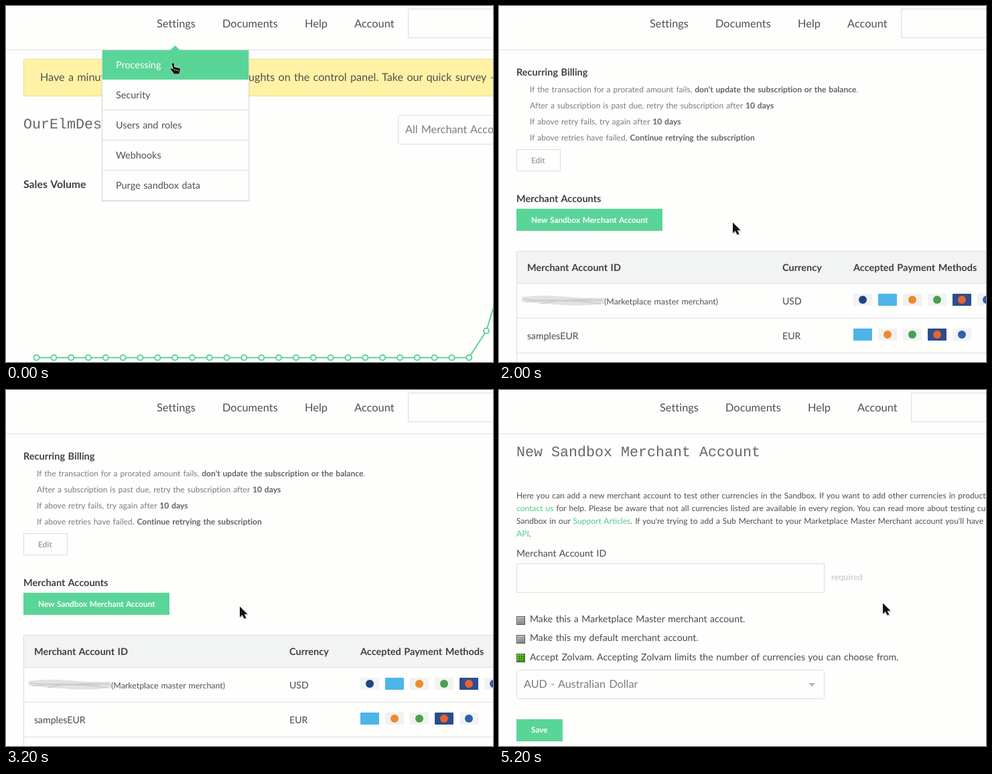
Write an HTML page that moves like this. It is 727 px wide and 532 px high and loops after 6 s.

```html
<!DOCTYPE html>
<html lang="en">
<head>
<meta charset="utf-8">
<title>Control panel</title>
<style>
html, body { margin: 0; width: 100%; height: 100%; overflow: hidden; background: #fefefd; }
svg { display: block; width: 727px; height: 532px; }
text { font-family: Lato, "Open Sans", sans-serif; fill: #505052; word-spacing: .07em; font-variant-ligatures: none; text-rendering: geometricPrecision; white-space: pre; }
.nav { font-size: 16.4px; }
.big { font-size: 16.2px; }
.mid { font-size: 14.4px; }
.form { font-size: 14.1px; fill: #454c50; }
.small { font-size: 12.08px; }
.dim { fill: #7a7c7e; }
.pale { fill: #c3c4c5; }
.head, .btn, .strong { font-weight: 700; }
.head { font-size: 14.5px; fill: #404043; }
.strong { fill: #626365; }
.btn { font-size: 11.8px; fill: #fff; }
.mono { font: 21.67px "Liberation Mono", "Courier New", monospace; fill: #666668; word-spacing: 0; }
.link { fill: #4fc98c; }
.green { fill: #5ad598; }
.box { fill: #fefefd; stroke: #dcdddd; }
.rule { stroke: #dcdddd; fill: none; }
.scene { visibility: hidden; animation: show 6s step-end infinite; }
#accounts { animation-delay: -4s; }
#create { animation-delay: -2s; }
@keyframes show {
  0% { visibility: visible; }
  33.3333%, 100% { visibility: hidden; }
}
</style>
</head>
<body>
<svg viewBox="0 0 727 532">
  <defs>
    <g id="nav">
      <text class="nav" y="32"><tspan x="225">Settings</tspan><tspan x="323">Documents</tspan><tspan x="446">Help</tspan><tspan x="520">Account</tspan></text>
      <path class="box" d="M750 4.5H600.5V47.5H750"/>
    </g>
    <g id="arrow" stroke-linejoin="round">
      <path d="M2 2V18L6 14.500L8.500 20L11 19L9 13.500H13.500Z" fill="#000" opacity=".25"/>
      <path d="M.5 .5V16.500L4.300 13L7 18.800L9.800 17.500L7.300 12H12Z" fill="#111" stroke="#fff" paint-order="stroke"/>
    </g>
    <g id="check">
      <rect x=".5" y=".5" width="12" height="12" stroke="#555"/>
      <path d="M1.5 11V1.5H11" fill="none" stroke="#fff" stroke-opacity=".4"/>
    </g>
    <linearGradient id="gray" x2="0" y2="1">
      <stop stop-color="#b5b5b5"/><stop offset="1" stop-color="#858585"/>
    </linearGradient>
    <pattern id="lit" width="3" height="3" patternUnits="userSpaceOnUse">
      <rect width="3" height="3" fill="#4cc40d"/>
      <rect x="1" y="1" width="1.5" height="1.5" fill="#1f4d0c"/>
    </pattern>
  </defs>
  <rect width="727" height="532" fill="#fefefd"/>
  <path class="rule" d="M0 65.5H727"/>

  <g class="scene" id="menu">
    <use href="#nav"/>
    <rect x="26.5" y="79.5" width="720" height="55" fill="#fff2a4" stroke="#eee08f"/>
    <text class="big" x="51" y="112">Have a minute?</text>
    <text class="big" x="362" y="112">ughts on the control panel. Take our quick survey –</text>
    <text class="mono" x="26" y="183">OurElmDesk</text>
    <rect class="box" x="585.5" y="163.5" width="160" height="43" rx="3"/>
    <text class="big dim" x="596" y="190">All Merchant Accounts</text>
    <text class="head" x="26" y="272" style="font-size:15.8px">Sales Volume</text>
    <g id="chart" fill="#fefefd" stroke="#5ad598" stroke-width="2"></g>
    <rect x="142.5" y="67" width="221" height="225.5" rx="2" fill="#000" opacity=".09"/>
    <rect class="box" x="143.5" y="65.5" width="219" height="225"/>
    <path class="green" d="M144 66H362V110H144ZM245 66L252.5 59L260 66Z"/>
    <path class="rule" d="M144 155.5H362M144 200.5H362M144 245.5H362"/>
    <text class="mid"><tspan x="164" y="93" fill="#fff">Processing</tspan><tspan x="164" y="138">Security</tspan><tspan x="164" y="183">Users and roles</tspan><tspan x="164" y="228">Webhooks</tspan><tspan x="164" y="273">Purge sandbox data</tspan></text>
    <path d="M248 85.5q2.5 -1 3 1.5v4l8 2q1.5 .5 1 3l-1.5 5.5h-7.5l-5 -6.5q-.5 -2.5 2 -1.5l2 1.5l-2.5 -8q0 -1 .5 -1.5Z" fill="#111" stroke="#fff" paint-order="stroke"/>
    <path d="M252 94v3M255 95v2M257.5 95.5v2" stroke="#fff" stroke-width=".8"/>
  </g>

  <g class="scene" id="accounts">
    <use href="#nav"/>
    <text class="head" x="26" y="104">Recurring Billing</text>
    <text class="small dim" x="46" y="129">If the transaction for a prorated amount fails, <tspan class="strong">don't update the subscription or the balance</tspan>.</text>
    <text class="small dim" x="46" y="153">After a subscription is past due, retry the subscription after <tspan class="strong">10 days</tspan></text>
    <text class="small dim" x="46" y="177">If above retry fails, try again after <tspan class="strong">10 days</tspan></text>
    <text class="small dim" x="46" y="201">If above retries have failed, <tspan class="strong">Continue retrying the subscription</tspan></text>
    <rect class="box" x="26.5" y="214.5" width="65" height="32"/>
    <text class="btn" x="48" y="235" style="fill:#a0a1a2">Edit</text>
    <text class="head" x="26" y="293">Merchant Accounts</text>
    <rect class="green" x="26" y="303" width="218" height="33"/>
    <text class="btn" x="48" y="324">New Sandbox Merchant Account</text>
    <rect x="26" y="366" width="701" height="48" fill="#f2f3f3"/>
    <path class="rule" d="M727 366.5H26.5V532M26 414.5H727M26 466.5H727M26 518.5H727"/>
    <text class="head" y="396"><tspan x="42">Merchant Account ID</tspan><tspan x="423">Currency</tspan><tspan x="529">Accepted Payment Methods</tspan></text>
    <path d="M34 435q30 -4 60 -1t63 2v9q-30 4 -60 2t-63 -5Z" fill="#e2e2e1"/>
    <path d="M37 438q40 5 118 1M40 442q50 -6 112 3M62 445q40 -9 92 -5" fill="none" stroke="#cbcccc" stroke-width="1.6"/>
    <text class="small" x="157" y="446" style="font-size:12.4px">(Marketplace master merchant)</text>
    <text class="form"><tspan x="423" y="446">USD</tspan><tspan x="42" y="498">samplesEUR</tspan><tspan x="423" y="498">EUR</tspan></text>
    <g id="cards"></g>
    <use href="#arrow" x="348.5" y="323"/>
  </g>

  <g class="scene" id="create">
    <use href="#nav" x="15"/>
    <text class="mono" x="26" y="99">New Sandbox Merchant Account</text>
    <text class="small" x="26" y="162">Here you can add a new merchant account to test other currencies in the Sandbox. If you want to add other currencies in production,</text>
    <text class="small" x="26" y="181"><tspan class="link">contact us</tspan> for help. Please be aware that not all currencies listed are available in every region. You can read more about testing currencies</text>
    <text class="small" x="26" y="200">Sandbox in our <tspan class="link">Support Articles</tspan>. If you're trying to add a Sub Merchant to your Marketplace Master Merchant account you'll have to</text>
    <text class="small" x="26" y="219"><tspan class="link">API</tspan>.</text>
    <text class="form" x="26" y="249">Merchant Account ID</text>
    <rect class="box" x="26.5" y="259.5" width="459" height="43"/>
    <text class="pale" x="496" y="284" font-size="12.8">required</text>
    <use href="#check" x="26" y="338" fill="url(#gray)"/>
    <use href="#check" x="26" y="366" fill="url(#gray)"/>
    <use href="#check" x="26" y="394" fill="url(#lit)"/>
    <text class="form"><tspan x="46" y="347">Make this a Marketplace Master merchant account.</tspan><tspan x="46" y="375">Make this my default merchant account.</tspan><tspan x="46" y="404">Accept Zolvam. Accepting Zolvam limits the number of currencies you can choose from.</tspan></text>
    <rect class="box" x="26.5" y="418.5" width="459" height="43" rx="3"/>
    <text class="big dim" x="37" y="445">AUD - Australian Dollar</text>
    <path d="M462 438H472L467 443.5Z" fill="#b4b5b6"/>
    <rect class="green" x="26" y="492" width="69" height="33"/>
    <text class="btn" x="48" y="512">Save</text>
    <use href="#arrow" x="572.5" y="318"/>
  </g>
</svg>
<script>
const add = (parent, tag, attrs) => {
  const el = document.createElementNS("http://www.w3.org/2000/svg", tag);
  for (const key in attrs) el.setAttribute(key, attrs[key]);
  parent.append(el);
};

// Sales chart: a flat run, then a rise past the right edge
const chart = document.getElementById("chart");
const points = Array.from({ length: 26 }, (_, i) => [45.5 + i * 25.83, 525.5]);
points.push([717, 485.5], [743, 400]);
add(chart, "polyline", { points: points.join(" "), fill: "none" });
for (const [cx, cy] of points) add(chart, "circle", { cx, cy, r: 4 });

// Payment cards: background and a plain dot
const cards = document.getElementById("cards");
const kinds = [
  ["#f1f2f4", "#1f4484"], ["#4db5e8", "#4db5e8"], ["#f1f1ef", "#ed8a2d"],
  ["#f1f2f1", "#4a9f52"], ["#2c4d8f", "#e9632d"], ["#f1f2f4", "#2f5fae"]
];
const drawRow = (list, y) => list.forEach(([back, dot], i) => {
  const x = 529 + i * 37;
  add(cards, "rect", { x, y, width: 28, height: 18, rx: 1, fill: back });
  add(cards, "circle", { cx: x + 14, cy: y + 9, r: 6, fill: dot });
});
drawRow(kinds, 430);
drawRow(kinds.slice(1), 482);
</script>
</body>
</html>
```
